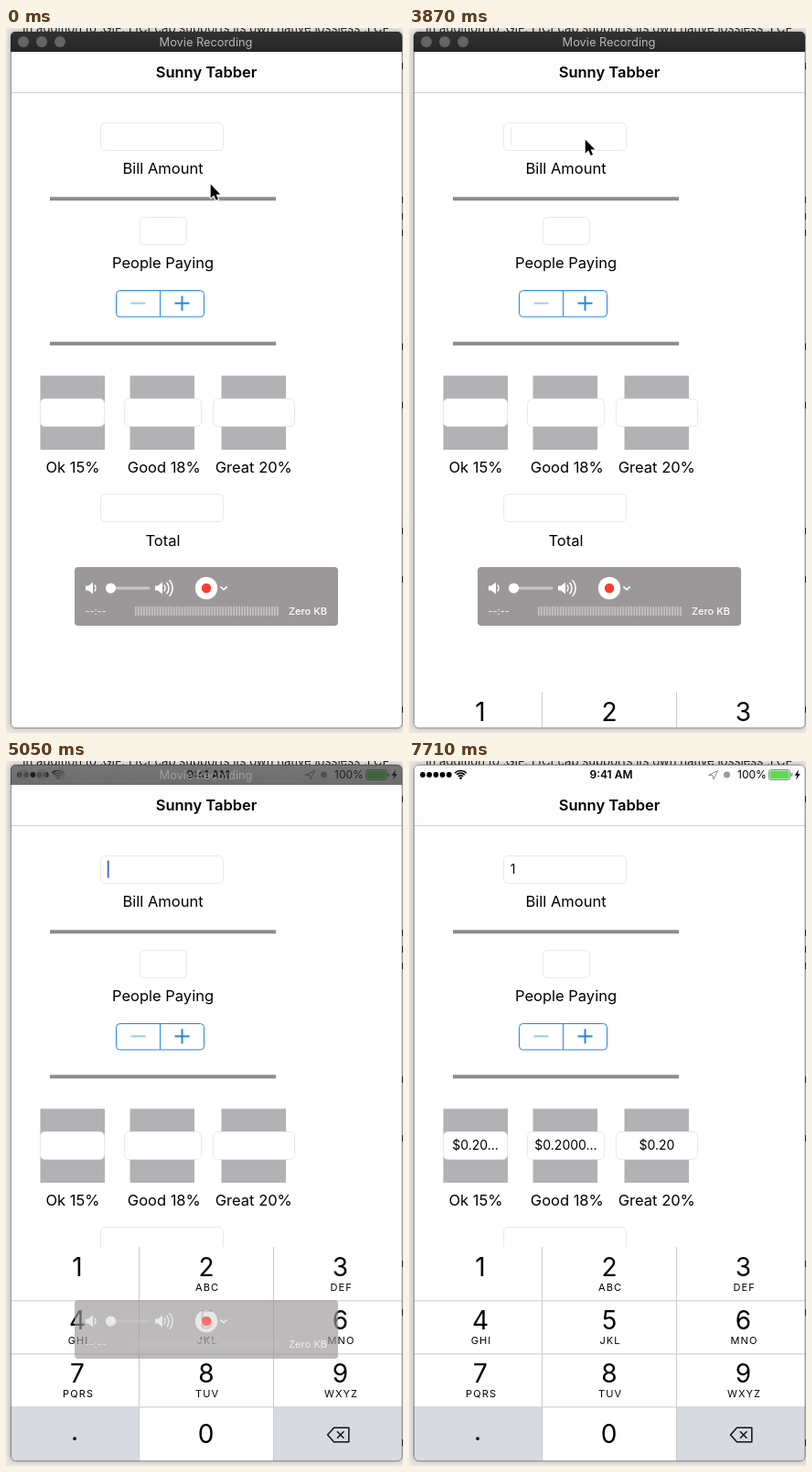
Recreate the animation shown at these times as an HTML page with a canvas. Size 434 by 769 pixels, loop 8000 ms.

```html
<!DOCTYPE html>
<html lang="en">
<head>
<meta charset="utf-8">
<title>Tip calculator</title>
<style>
  html, body { margin: 0; width: 100%; height: 100%; overflow: hidden; background: #e9e6e1; }
  canvas { display: block; width: 434px; height: 769px; }
</style>
</head>
<body>
<canvas id="stage"></canvas>
<script>
const W = 434, H = 769, LOOP = 8000;
const FONT = 'Inter, "Liberation Sans", sans-serif';
const canvas = document.getElementById('stage');
const c = canvas.getContext('2d');
const dpr = window.devicePixelRatio || 1;
canvas.width = W * dpr;
canvas.height = H * dpr;

const clamp = v => Math.max(0, Math.min(1, v));
const mix = (a, b, p) => a + (b - a) * p;
const smooth = p => p * p * (3 - 2 * p);

function rect(x, y, w, h, color) {
  c.fillStyle = color;
  c.fillRect(x, y, w, h);
}

function round(x, y, w, h, r, fill, stroke) {
  c.beginPath();
  c.roundRect(x, y, w, h, r);
  if (fill) { c.fillStyle = fill; c.fill(); }
  if (stroke) { c.strokeStyle = stroke; c.lineWidth = 1; c.stroke(); }
}

function disc(x, y, r, color) {
  c.beginPath();
  c.arc(x, y, r, 0, 7);
  c.fillStyle = color;
  c.fill();
}

function path(points, color, width, close) {
  c.beginPath();
  points.forEach(([x, y]) => c.lineTo(x, y));
  if (close) c.closePath();
  if (width) { c.strokeStyle = color; c.lineWidth = width; c.stroke(); }
  else { c.fillStyle = color; c.fill(); }
}

function arc(x, y, r, from, to, color, width) {
  c.beginPath();
  c.arc(x, y, r, from, to);
  c.strokeStyle = color;
  c.lineWidth = width;
  c.stroke();
}

function text(s, x, y, size, { color = '#000', weight = 400, align = 'center', gap = 0 } = {}) {
  c.font = `${weight} ${size}px ${FONT}`;
  c.textAlign = align;
  c.letterSpacing = gap + 'px';
  c.fillStyle = color;
  c.fillText(s, x + gap / 2, y);
}

const field = (x, y, w) => round(x, y, w, 30, 5, '#fff', '#e9e9e9');

function desktop() {
  rect(0, 0, W, H, '#e9e6e1');
  text('In addition to .GIF, LICEcap supports its own native lossless .LCF', 18, 5, 13.2,
    { color: '#222', align: 'left' });
  for (const y of [38, 184, 202, 220, 344, 408, 545, 598, 740]) rect(433, y, 1, 7, '#333');
  c.save();
  c.shadowColor = 'rgba(0,0,0,.3)';
  c.shadowBlur = 5 * dpr;
  round(5, 4, 428, 759.5, 5, '#fff');
  c.restore();
}

function statusBar() {
  for (let i = 0; i < 5; i++) disc(15 + i * 7.2, 15, 2.9, '#000');
  for (const r of [3.6, 6.3, 9]) arc(56.5, 19.5, r, -2.35, -0.79, '#000', 1.7);
  disc(56.5, 18.7, 1.4, '#000');
  text('9:41 AM', 221, 19, 12, { weight: 600 });
  path([[327.5, 15.5], [337.5, 10.5], [333, 20], [332.3, 15.8]], '#8b8b8b', 1, true);
  disc(347.5, 15, 3.5, '#9a9a9a');
  text('100%', 375, 19, 12);
  round(393.5, 9.5, 23, 11, 2, '#fff', '#8d8d8d');
  round(394.5, 10.5, 21, 9, 1.2, '#5fd85a');
  round(417.5, 13, 1.8, 4, 1, '#8d8d8d');
  path([[426, 9.5], [421.5, 15.7], [424.2, 15.7], [423, 20.5], [427.7, 14], [425, 14]], '#000');
}

function app(typed) {
  rect(5, 4, 428, 760, '#fff');
  rect(5, 4, 428, 66, '#fdfdfd');
  rect(5, 70, 428, 1, '#d2d2d2');
  statusBar();
  text('Sunny Tabber', 219, 53.5, 16.5, { weight: 600 });

  field(103.5, 103.5, 134);
  text('Bill Amount', 171.5, 159, 16.5);
  rect(48, 184.3, 247, 4, '#8b8b8b');
  field(146.5, 206.5, 51);
  text('People Paying', 171.5, 262.3, 16.5);

  const blue = '#2a85ea';
  round(120.5, 286.5, 96, 28.5, 4, '#fff', blue);
  rect(168, 286.5, 1, 28.5, blue);
  rect(136.5, 299.3, 16, 2, '#9fc9f6');
  rect(184.5, 299.3, 16, 2, blue);
  rect(191.5, 292.3, 2, 16, blue);
  rect(48, 342.3, 247, 4, '#8b8b8b');

  const tips = [
    ['Ok 15%', 73, 37.5, 37.5, 70, '$0.20...'],
    ['Good 18%', 172.8, 135.5, 129.5, 84, '$0.2000...'],
    ['Great 20%', 270.8, 235.5, 226.5, 89, '$0.20']
  ];
  for (const [label, cx, boxX, x, w, value] of tips) {
    rect(boxX, 379.3, 70.5, 80.7, '#b2b1b3');
    field(x, 404.5, w);
    text(label, cx, 485.3, 16.5);
    if (typed) text(value, x + w / 2, 424, 14);
  }
  field(103.5, 508.5, 134);
  text('Total', 171.5, 564.8, 16.5);
  if (typed) text('1', 110.7, 123.3, 14, { align: 'left' });
}

function keypad(drop, pressed) {
  const letters = ['', 'ABC', 'DEF', 'GHI', 'JKL', 'MNO', 'PQRS', 'TUV', 'WXYZ'];
  const centers = [78, 219, 365.5];
  const shade = '#d8dae2', line = '#c9c9cb';
  c.save();
  c.translate(0, drop);
  rect(5, 530, 428, 234, '#fff');
  if (pressed) rect(5, 530, 140, 58.5, shade);
  rect(5, 705, 140, 59, shade);
  rect(293, 705, 140, 59, shade);
  for (const y of [588.3, 646.3, 704.3]) rect(5, y, 428, 1, line);
  for (const x of [145, 292]) rect(x, 530, 1, 234, line);
  letters.forEach((s, i) => {
    const x = centers[i % 3], y = 562 + Math.floor(i / 3) * 58.2;
    text(String(i + 1), x, y, 28);
    text(s, x + 0.5, y + 16, 11, { gap: 1.1 });
  });
  text('0', 218.5, 743.7, 28);
  text('.', 75, 740.5, 28);
  c.lineJoin = 'round';
  path([[351.5, 735], [358.5, 727.3], [374.8, 727.3], [374.8, 742.8], [358.5, 742.8]], '#111', 1.5, true);
  path([[362, 731.3], [369.4, 738.7]], '#111', 1.5);
  path([[369.4, 731.3], [362, 738.7]], '#111', 1.5);
  c.restore();
}

function titleBar() {
  const g = c.createLinearGradient(0, 4, 0, 26);
  g.addColorStop(0, '#323233');
  g.addColorStop(1, '#262627');
  round(5, 4, 428, 22, [5, 5, 0, 0], g);
  for (const x of [19, 39, 59]) disc(x, 15, 6, '#646465');
  text('Movie Recording', 218.5, 19.8, 12.8, { color: '#b6b6b6' });
}

function speaker(x, waves) {
  path([[x, 608.5], [x + 3, 608.5], [x + 8, 604.5], [x + 8, 617.5], [x + 3, 613.5], [x, 613.5]], '#fff');
  for (let i = 0; i < waves; i++) arc(x + 6, 611, 5 + i * 4, -0.75, 0.75, '#fff', 1.5);
}

function recorder() {
  round(75, 588, 288, 64, 4, '#9b989a');
  speaker(87, 1);
  round(114, 609.6, 43.5, 2.8, 1.4, '#c9c7c8');
  disc(114.5, 611, 5.6, '#fff');
  speaker(163, 3);
  disc(219, 611, 12.2, '#fff');
  disc(219, 611, 5.2, '#ff3a2f');
  path([[234.3, 609.3], [238, 612.7], [241.7, 609.3]], '#fff', 1.6);
  text('--:--', 86.5, 640, 11, { color: '#f4f4f4', align: 'left' });
  for (let i = 0; i < 53; i++) rect(141 + i * 2.98, 631, 1.8, 10, '#c3c1c2');
  text('Zero KB', 330, 640, 11, { color: '#fff', weight: 500 });
}

function pointer(x, y) {
  const arrow = [[0, 0], [0, 15], [3.5, 11.8], [6, 17.3], [8.3, 16.3], [5.9, 10.9], [10.6, 10.9]]
    .map(([dx, dy]) => [x + dx, y + dy]);
  c.lineJoin = 'round';
  path(arrow, '#fff', 2, true);
  path(arrow, '#000');
}

const moveStep = t => Math.floor((t - 496) / 145.5);
const typeStep = t => Math.floor((t - 3862) / 147.6);

function pointerAt(t) {
  const k = moveStep(t);
  const out = smooth(clamp((k + 1) / 3));
  const back = smooth(clamp((k - 4) / 5));
  return [mix(mix(223.7, 52, out), 192.7, back), mix(mix(170.5, 360, out), 121.7, back)];
}

function caretAlpha(k) {
  if (k < 0) return 0;
  if (k >= 21) return clamp(1 - (k - 23) / 3);
  const d = (k - 15.5) / 6.8;
  return clamp(2 - Math.abs(d - Math.round(d)) * 6.8);
}

// Critically damped spring.
function keypadDrop(k) {
  if (k < 0) return 234;
  const p = 18.26 * (0.04 + k * 0.1465);
  return k > 2 ? 0 : 233 * (1 + p) * Math.exp(-p);
}

const chromeAlpha = k => clamp(1 - 0.33 * (k - (k < 7 ? 4 : 7)));

function draw(t) {
  const k = typeStep(t), typed = k >= 21;
  c.setTransform(dpr, 0, 0, dpr, 0, 0);
  desktop();

  c.save();
  c.beginPath();
  c.roundRect(5, 4, 428, 759.5, 5);
  c.clip();
  app(typed);
  c.globalAlpha = caretAlpha(k);
  rect(typed ? 117.3 : 110.7, 108.5, 2, 19, '#476bdc');
  c.globalAlpha = 1;
  if (k >= 0) keypad(keypadDrop(k), k === 21);
  c.restore();
  round(5.5, 4.5, 427.5, 759, 5, null, 'rgba(0,0,0,.4)');

  c.globalAlpha = chromeAlpha(k);
  if (c.globalAlpha > 0) {
    titleBar();
    recorder();
  }
  c.globalAlpha = 1;
  if (k < 7) pointer(...pointerAt(t));
}

const start = performance.now();
function tick() {
  draw((performance.now() - start) % LOOP);
  requestAnimationFrame(tick);
}
tick();
</script>
</body>
</html>
```
